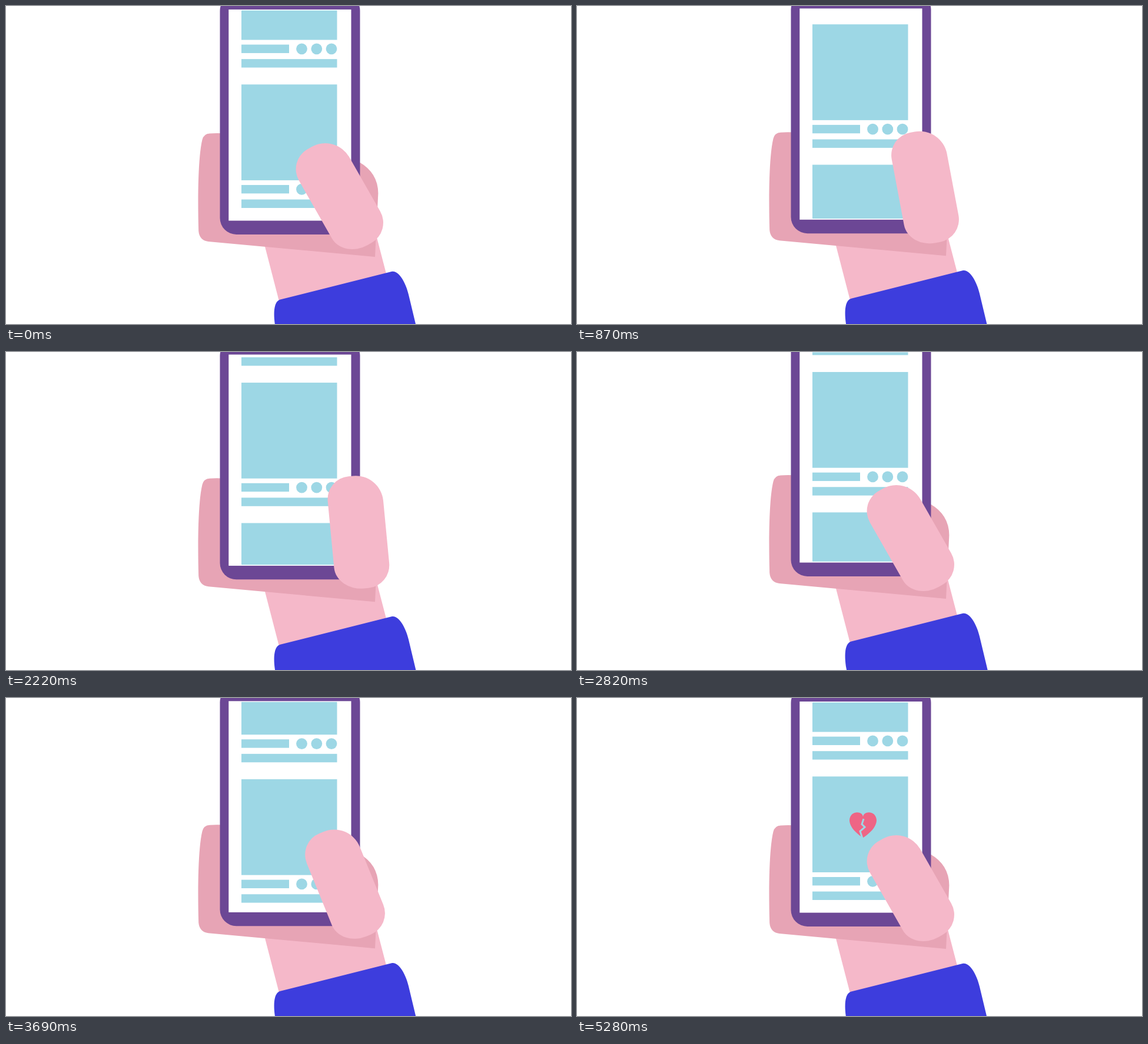
Animation of 960x540 px, one loop 5310 ms. Source, as an HTML page:

```html
<!DOCTYPE html>
<html lang="en">
<head>
<meta charset="utf-8">
<title>Scrolling hand</title>
<style>
html, body { margin: 0; width: 100%; height: 100%; overflow: hidden; background: #fff; }
svg { display: block; width: 960px; height: 540px; }
.skin { fill: #f5b8c9; }
.shade { fill: #e7a4b5; }
.sleeve { fill: #3d3ddd; }
.case { fill: #6c4795; }
.post { fill: #9dd7e5; }
</style>
</head>
<body>
<svg viewBox="0 0 960 540">
  <defs>
    <clipPath id="screen"><rect x="378" y="7.5" width="209" height="355.4"/></clipPath>
    <g id="post" class="post">
      <rect x="400" width="162.5" height="162.7"/>
      <rect x="400" y="170.7" width="81" height="14.4"/>
      <circle cx="502.5" cy="178" r="9.4"/>
      <circle cx="527.8" cy="178" r="9.4"/>
      <circle cx="553" cy="178" r="9.4"/>
      <rect x="400" y="195.3" width="162.5" height="14.4"/>
    </g>
  </defs>
  <g id="hand">
    <path class="skin" d="M430 370 463.7 500 648 462 624 370Z"/>
    <path class="sleeve" d="M466 590 456.8 540C453.5 515 457 501 466 498.5L655 451C668 448 680 472 684 490L708 590Z"/>
    <path class="shade" d="M370 216.3Q356 215.6 346 216.5Q336 217 333.5 227C326 258 325.7 330 327.2 382Q328.5 398 344 400L627 426 632.4 318Q632 283 600 265Z"/>
    <rect class="case" x="363.5" y="-20" width="238" height="408" rx="28"/>
    <rect x="378.3" y="6" width="208.2" height="358.6" fill="#fff"/>
    <g clip-path="url(#screen)"><g id="feed"></g></g>
    <g id="thumb" class="skin">
      <path d="M-58-140.7a39 39 0 0 1 39-39h8a47 47 0 0 1 47 47v106a39 39 0 0 1-39 39h-8a47 40 0 0 1-47-40Z"/>
    </g>
  </g>
</svg>
<script>
const LOOP = 5310, PITCH = 238.4, TOP = 133.3, LAST = 7, REST = -29.7, REACH = -52;

// Each swipe lifts the phone, then the thumb flicks the feed.
const swipes = [
  { lift: 0, thumb: 31, distance: 346.5 },
  { lift: 1338, thumb: 1395, distance: 461 },
  { lift: 2705, thumb: 2823, distance: 384.5 },
  { lift: 4060, thumb: 4200, distance: 476.8 }
];

const [hand, feed, thumb] = ['hand', 'feed', 'thumb'].map(id => document.getElementById(id));
const progress = (t, start, length) => Math.min(1, Math.max(0, (t - start) / length));
const smooth = (...span) => (1 - Math.cos(Math.PI * progress(...span))) / 2;
const remaining = (...span) => (1 - progress(...span)) ** 3;
const total = part => swipes.reduce((sum, swipe) => sum + part(swipe), 0);

const lift = t => total(s =>
  -16 * Math.sin(Math.PI / 2 * progress(t, s.lift, 400)) * remaining(t, s.lift + 400, 907));

const angle = t => REST + total(s =>
  (REACH - REST) * smooth(t, s.thumb, 100)
  - REACH * smooth(t, s.thumb + 350, 350)
  + REST * smooth(t, s.thumb + 795, 110));

const scroll = t => total(s => s.distance * (1 - remaining(t, s.thumb + 350, 682)));

let posts = '';
for (let k = -1; k <= LAST + 1; k++) posts += `<use href="#post" y="${TOP + k * PITCH}"/>`;
feed.innerHTML = posts + `<g transform="translate(486 ${TOP + LAST * PITCH + 61})">
  <path fill="#ee6585" d="M0 8C0-3-22-4-23 13C-23 25-11 36 0 43C11 36 23 25 23 13C22-4 0-3 0 8Z"/>
  <path fill="none" stroke="#9dd7e5" stroke-width="3" d="M1 11-2 20 3 25-5 32-1 44"/>
</g>`;

function draw() {
  const t = performance.now() % LOOP;
  hand.setAttribute('transform', `translate(0 ${lift(t)})`);
  feed.setAttribute('transform', `translate(0 ${-scroll(t)})`);
  thumb.setAttribute('transform', `translate(617.8 389.9) rotate(${angle(t)})`);
  requestAnimationFrame(draw);
}
draw();
</script>
</body>
</html>
```
